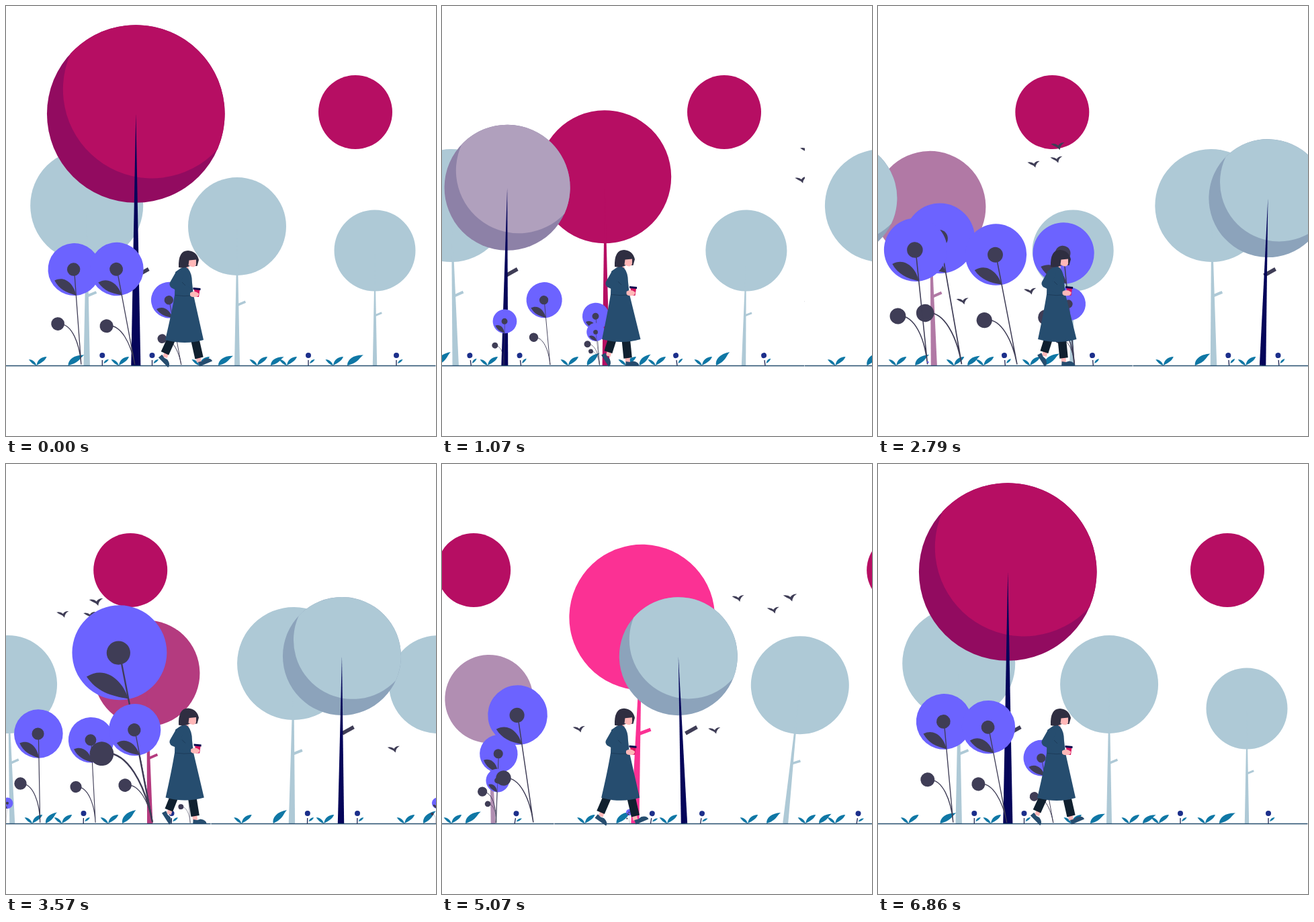
An HTML page for the animation above (6930 ms loop, 640 px wide and 640 px high).

```html
<!DOCTYPE html>
<html lang="en">
<head>
<meta charset="utf-8">
<title>Walk in the park</title>
<style>
html, body { margin: 0; width: 100%; height: 100%; overflow: hidden; background: #fff; }
svg { display: block; width: 100vw; height: 100vh; }
</style>
</head>
<body>
<svg id="stage" viewBox="0 0 640 640">
  <defs>
    <clipPath id="tileClip"><rect width="640" height="640"/></clipPath>
    <g id="tile" clip-path="url(#tileClip)">
      <circle cx="520" cy="158" r="55" fill="#b60e63"/>
      <g id="birds" fill="#3f3d56"></g>
      <g id="trees"></g>
      <g id="plants"></g>
      <g id="flowers"></g>
      <path d="M0 535.6H639.4" stroke="#254d6e" stroke-width="1.5"/>
    </g>
  </defs>
  <g id="world"><use href="#tile"/><use href="#tile" x="640"/></g>
  <g id="walker">
    <g id="legs"></g>
    <g id="body">
      <path d="M263 384H271L272 394H262Z" fill="#ffb8b8"/>
      <path id="coat" fill="#264d6f"/>
      <path d="M257 389Q256 364 271 364Q284 365 287 378L284.500 387H274Q265 391 257 389Z" fill="#2f2e41"/>
      <path d="M272.500 378.500L283 377.500V385Q281 389.500 276 388L271.500 386Z" fill="#ffb8b8"/>
      <path id="arm" fill="none" stroke="#264d6f" stroke-width="13" stroke-linecap="round" stroke-linejoin="round"/>
      <path d="M262 411L267 416M252 430.500Q265 432.500 278 431" fill="none" stroke="#1d3c5a" stroke-width="1"/>
      <g id="cup">
        <path d="M280 422H288.500L287 433H281.500Z" fill="#d9165f"/>
        <path d="M278.500 419L289.500 420V423L278.500 422Z" fill="#090a4f"/>
        <path d="M274 427Q278 424 283 425.500L287 428Q287 433 282 433Q276 434 274 431Z" fill="#ffb8b8"/>
      </g>
    </g>
  </g>
</svg>
<script>
const LOOP = 6930, STEPS = 97, GROUND = 535;
const DARK = '#3f3d56', PURPLE = '#6c63ff', TEAL = '#0f77a5';
const PALE = [174, 201, 214], PALE_SHADE = [140, 163, 187];
const MAGENTA = [182, 14, 99], MAGENTA_SHADE = [146, 11, 96], PINK = [251, 49, 148];
const { PI, sin, cos, min, max } = Math;

const byId = id => document.getElementById(id);
function set(el, attrs) {
  for (const name in attrs) el.setAttribute(name, attrs[name]);
}
function add(parent, tag, attrs = {}) {
  const el = document.createElementNS('http://www.w3.org/2000/svg', tag);
  set(el, attrs);
  parent.appendChild(el);
  return el;
}
const at = (x, angle = 0, s = 1) => `translate(${x} ${GROUND}) rotate(${angle}) scale(${s})`;

const clamp = x => min(1, max(0, x));
const linear = x => x;
const smooth = x => x * x * (3 - 2 * x);
const lerp = (a, b, p) => a + (b - a) * p;
const mix = (a, b, p) => `rgb(${a.map((v, i) => Math.round(lerp(v, b[i], p)))})`;

// Eased value between key points [step, value].
function tween(points, f, ease = smooth) {
  const next = points.findIndex(p => p[0] > f);
  if (next < 0) return points[points.length - 1][1];
  const [a, from] = points[next - 1], [b, to] = points[next];
  return lerp(from, to, ease((f - a) / (b - a)));
}
// Lifetimes may run past the end of the loop into its beginning.
const inLife = (f, birth, death) => f < birth && f + STEPS <= death ? f + STEPS : f;

// A tree swells and changes colour between rise and fall; it leans to two extremes per loop.
const RAMP = 7;
function makeTree({ x, h, r, half, grow, color, rise, fall, lean, shaded }) {
  const root = add(byId('trees'), 'g', { transform: at(x) });
  if (shaded) add(root, 'path', { d: 'M2-134L19-143.5', stroke: DARK, 'stroke-width': 5.5 });
  const g = add(root, 'g');
  const crown = add(g, 'circle', { cy: -h, r });
  const light = shaded && add(g, 'path', {
    d: 'M.915 .403A1 1 0 0 1-.735-.678A1 1 0 0 1 .915 .403Z',
    transform: `translate(0 ${-h}) scale(${r})`
  });
  const trunk = add(g, 'path', { d: `M${-half} 0L0 ${-h}L${half} 0Z`, fill: '#05055a' });
  const branch = !shaded && add(g, 'path', {
    d: `M0 ${-.433 * h}L${.06 * h} ${-.458 * h}`, 'stroke-width': .017 * h
  });
  const sway = [[0, 0], ...lean, [STEPS, 0]];
  return f => {
    const u = inLife(f, rise, fall), p = clamp(min(u - rise, fall - u) / RAMP);
    const fill = mix(PALE, color, p);
    set(g, { transform: `rotate(${tween(sway, f)}) scale(${1 + grow * smooth(p)})` });
    if (shaded) {
      set(light, { fill });
      set(crown, { fill: mix(PALE_SHADE, MAGENTA_SHADE, p) });
    } else {
      set(crown, { fill });
      set(trunk, { fill });
      set(branch, { stroke: fill });
    }
  };
}
const trees = [
  { x: 344, h: 207, r: 73, half: 4, grow: .356, color: MAGENTA, rise: 7, fall: 42, lean: [[50, -1.7], [71, 6]] },
  { x: 549, h: 171, r: 60.5, half: 3.2, grow: .36, color: MAGENTA, rise: 44.7, fall: 73.2, lean: [[25, 2], [62, -2.3]] },
  { x: 120.2, h: 238, r: 84, half: 4.7, grow: .29, color: PINK, rise: 63, fall: 94, lean: [[22, -2], [68, 2]] },
  { x: 193.3, h: 249, r: 88, half: 4.7, grow: .504, color: MAGENTA, rise: 79.45, fall: 113.55,
    lean: [[34, 2], [70, -2]], shaded: true }
].map(makeTree);

// A flower, drawn one unit tall, shoots up, leans back and then forward, and shrinks away.
function makeFlower([x, size, birth, death]) {
  const g = add(byId('flowers'), 'g');
  const line = { fill: 'none', stroke: DARK, 'stroke-width': .009 };
  add(g, 'circle', { cy: -1, r: .272, fill: PURPLE });
  add(g, 'path', { d: 'M0-1V-.01M-.21-.45C-.06-.45 0-.22 0-.01', ...line });
  add(g, 'circle', { cx: -.006, cy: -1, r: .068, fill: DARK });
  add(g, 'circle', { cx: -.211, cy: -.449, r: .069, fill: DARK });
  add(g, 'path', { d: 'M-.212-.9C-.1-.945-.015-.85 0-.73C-.1-.765-.17-.805-.212-.9Z', fill: DARK });
  return f => {
    const u = inLife(f, birth, death);
    const scale = size * smooth(clamp((u - birth) / 10)) * smooth(clamp((death - u) / 15));
    const angle = -11 * sin(1.25 * PI * (u - birth) / (death - birth));
    set(g, { display: scale > .5 ? 'inline' : 'none', transform: at(x, angle, scale) });
  };
}
const flowers = [
  [112, 160, 69, 109], [192, 146, 78, 119], [261, 99, 83, 126],
  [385.5, 192, 17, 59.5], [334.5, 173, 10.5, 54], [334.5, 100, 10, 41],
  [468, 168, 23, 60], [553, 259, 33, 77.5], [553.5, 142, 33, 78], [609, 163, 46, 89]
].map(makeFlower);

// Small plants along the ground.
const plants = byId('plants');
for (const x of [45.5, 168, 288, 374, 418, 487]) {
  add(plants, 'path', {
    d: 'M0 0C-2-6-7-9-11.500-9C-9-5-5-1 0 0C1-8 7-13 15-13C13-7 7-4 0 0Z', fill: TEAL, transform: at(x)
  });
}
const leaves = [[92.5, 1], [316, .92], [394, .82], [508, 1]].map(([x, s]) => {
  const el = add(plants, 'path', { d: 'M0 0C0-9 9-16 24-15.500C17-11 17-4 0 0Z', fill: TEAL });
  return f => set(el, { transform: at(x, -6 * (1 - cos(PI * f / 16)), s) });
});
const buds = [143.3, 217.5, 450, 581].map(x => {
  const g = add(plants, 'g');
  add(g, 'path', { d: 'M0 0V-8', stroke: '#1a2250', 'stroke-width': 1.3 });
  add(g, 'circle', { cy: -15, r: 4, fill: '#1c2f8b' });
  add(g, 'path', { d: 'M2-3C3-7 6-9 9.500-9C8-6 6-4 2-3Z', fill: TEAL });
  return f => set(g, { transform: at(x, -9 * sin(PI * f / 48)) });
});

// Each bird crosses from one point to another and ends behind a crown or flower.
function makeBird({ from, to, start = 15, end = 84, scale = .88 }) {
  const el = add(byId('birds'), 'path', {
    d: 'M-10-2.500Q-3-4 1 0Q4-5 10.500-4.500Q4-1 3.500 6.500L0 3Q-5 1-10-2.500Z'
  });
  return f => {
    const p = clamp((f - start) / (end - start)) ** 1.1;
    const [x, y] = from.map((v, i) => lerp(v, to[i], p));
    set(el, {
      display: f < start ? 'none' : 'inline',
      transform: `translate(${x} ${y}) scale(${scale})`
    });
  };
}
const birds = [
  { from: [643, 214], to: [275, 194], scale: 1 },
  { from: [656, 235], to: [240, 212] },
  { from: [634, 258], to: [180, 184] },
  { from: [648, 442], to: [132, 384] },
  { from: [477, 450], to: [-10, 388], start: 29, end: 75 }
].map(makeBird);

// A foot swings on a shifted cosine, lifts behind and lands on its heel.
const HALF_CYCLE = 12;
function makeLeg(offset) {
  const g = add(byId('legs'), 'g');
  const skin = add(g, 'path', { stroke: '#ffb8b8', 'stroke-width': 7 });
  const trouser = add(g, 'path', { stroke: '#10202f', 'stroke-width': 12.5 });
  const shoe = add(g, 'path', { d: 'M-3 3L3 4L8 2.500Q17 4 17 10H-3.500Z', fill: '#264d6f' });
  return f => {
    const q = (f + offset) % (2 * HALF_CYCLE), turn = PI * q / HALF_CYCLE;
    const lift = max(0, cos(turn - 1.21 * PI));
    const sinceLanding = (q + HALF_CYCLE) % (2 * HALF_CYCLE) - HALF_CYCLE + .5;
    const heel = Math.abs(sinceLanding) < 2.5 ? cos(PI * sinceLanding / 5) : 0;
    const x = 262 + 26 * cos(turn + .19), y = 526 - 9 * lift, knee = 266.5 + .65 * (x - 266);
    set(skin, { d: `M${knee} 494L${x} ${y + 4}` });
    set(trouser, { d: `M${knee} 493L${x} ${y - 2}` });
    set(shoe, { transform: `translate(${x} ${y}) rotate(${58 * lift - 24 * heel})` });
  };
}
const legs = [makeLeg(HALF_CYCLE), makeLeg(0)];

function drawBody(f) {
  const bob = sin(PI * f / HALF_CYCLE) ** 2, hem = 3 * bob;
  const reach = max(0, sin(PI * (f % (2 * HALF_CYCLE)) / 16));
  set(byId('body'), { transform: `translate(0 ${-2 * bob})` });
  set(byId('coat'), {
    d: `M259 391Q266 386 271 391Q277 398 277 412L279 430L${294 + hem} 497Q${266 + hem} 505 ${237 + hem * .7} 497Q247 455 251 430L252 396Z`
  });
  set(byId('arm'), { d: `M258 400L250 414L${271 + 2 * reach} ${425 - 4 * reach}` });
  set(byId('cup'), { transform: `translate(${3 * reach} ${-5 * reach})` });
}

const scroll = [[0, 0], [29, 193.3], [50, 334.8], [84, 558.3], [96, 640]];
const drawWorld = f => set(byId('world'), { transform: `translate(${-tween(scroll, f, linear)} 0)` });

const parts = [drawWorld, ...trees, ...flowers, ...leaves, ...buds, ...birds, ...legs, drawBody];

function render(ms) {
  const f = Math.floor((ms % LOOP + 5) * STEPS / LOOP) % STEPS;
  parts.forEach(part => part(f));
}

const start = performance.now();
function tick() {
  render(performance.now() - start);
  requestAnimationFrame(tick);
}
tick();
</script>
</body>
</html>
```
